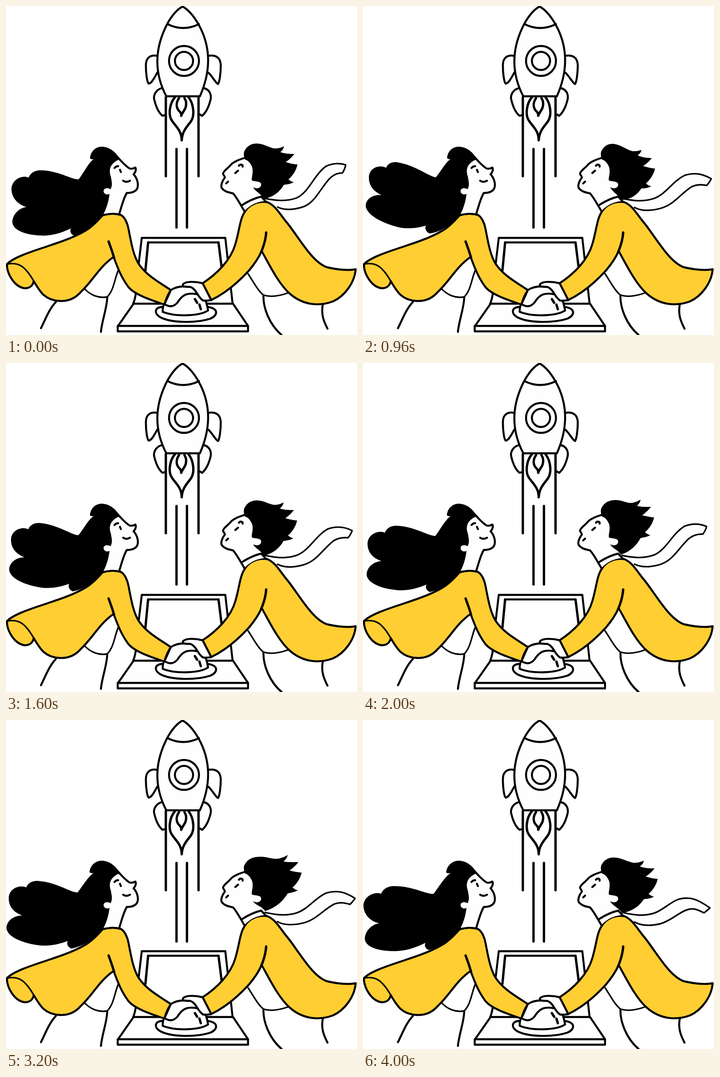
Write an HTML page that moves like this. It is 773 by 725 pixels and loops after 4080 ms.

```html
<!DOCTYPE html>
<html lang="en">
<head>
<meta charset="utf-8">
<title>Rocket launch</title>
<style>
  html, body { margin: 0; width: 100%; height: 100%; overflow: hidden; background: #fff; }
  svg { display: block; width: 100vw; height: 100vh; }
  .line { fill: none; stroke: #000; stroke-width: 4.4; stroke-linecap: round; stroke-linejoin: round; }
  .bold { stroke-width: 5.2; }
  .thin { stroke-width: 3.4; }
  .white { fill: #fefefe; }
  .coat { fill: #ffce33; }
  .skin { fill: #fefefe; stroke: none; }
</style>
</head>
<body>
<svg viewBox="0 0 773 725">
  <g class="line" id="rocket">
    <path d="M333 110C320 107 308 112 308 131C308 150 311 168 314 171C320 171 326 160 333 147M445 110C460 107 472 112 473 130C473 150 470 168 467 172C462 170 455 156 446 147"/>
    <path d="M343 181C332 184 325 194 326 204C330 222 337 236 345 242L351 240M436 181C448 184 452 194 451 204C447 222 440 235 432 242L427 239"/>
    <path class="white" d="M389 1C372 10 358 32 350 50C328 98 326 147 353 199H427C450 147 452 98 429 50C420 32 408 12 389 1Z"/>
    <path d="M356 40Q390 57 425 40"/>
    <circle cx="392" cy="121" r="33"/>
    <circle cx="392" cy="121" r="20"/>
    <path class="bold" d="M352 201V375M424 201V375M375.500 315V488M398.500 315V488"/>
    <path class="bold" d="M372 201C360 215 357 240 365 252C373 265 387 274 387 296C388 274 401 264 408 253C416 240 413 215 402 201"/>
    <path class="bold" d="M381 203C375 212 374 222 380 230C384 234 386 236 386 242C387 236 394 230 396 222C398 212 396 208 393 203"/>
  </g>

  <g class="line" id="laptop">
    <path d="M280 656C288 640 289 600 292 570L299 511H483L499 656"/>
    <path class="bold" d="M307 583L313 521M468 521L475 577"/>
    <path d="M313 521H468"/>
    <path class="white" d="M281 656H500L533 705V717H246V706Z"/>
    <path d="M246 705H533"/>
  </g>

  <g class="line" id="legs">
    <path d="M110 652C95 668 88 688 77 710M223 642C222 668 212 690 209 718"/>
    <path d="M567 638C566 665 580 702 607 725M698 656C693 680 700 695 708 711"/>
    <path class="thin" d="M172 622C185 637 205 645 223 641C238 625 238 605 247 583"/>
    <path class="thin" d="M533 590C545 608 555 628 567 637C585 643 605 638 622 632"/>
  </g>

  <path class="line thin white" id="scarf"/>

  <g class="line" id="coats">
    <path class="coat" d="M2 569C15 555 50 543 90 530C125 518 150 510 175 495C190 487 205 470 213 461C230 457 240 457 252 460C262 465 268 480 270 492C277 530 282 552 292 568C310 595 340 610 363 626C357 635 352 646 349 658C320 648 285 637 270 620C255 600 247 580 237 553C205 575 192 605 165 630C152 645 135 651 118 650C85 648 75 630 61 606C60 614 54 622 42 622C20 620 2 592 2 569Z"/>
    <path class="thin" d="M2 569C20 565 34 570 44 582C52 590 56 598 61 606"/>
    <path class="bold" d="M226 519C231 533 235 543 238 555"/>
    <path class="coat" d="M525 455C535 437 555 430 575 432C595 440 605 462 620 479C645 510 675 566 708 576C735 582 755 583 770 580C768 610 745 640 720 651C690 662 655 660 625 634C600 612 580 570 563 540C556 556 546 570 535 583C515 605 485 632 452 648L433 611C465 590 495 560 505 525C514 495 515 470 525 455Z"/>
    <path class="bold" d="M573 499C572 513 568 528 562 542"/>
  </g>

  <g class="line" id="hands">
    <path class="white" d="M345 663C327 664 325 677 340 686C365 699 420 699 450 689C468 681 468 666 443 663"/>
    <path class="white" d="M363 626C372 620 382 618 392 618H412C432 628 441 645 445 671C425 684 372 685 345 674C345 664 346 660 349 657Z"/>
    <path d="M349 657C360 664 370 663 378 653C388 637 398 631 420 635"/>
    <path class="bold" d="M416 646L421 654M426 658L429 668"/>
    <path class="white" d="M433 611C418 607 396 606 390 613C387 619 396 619 406 619C420 624 422 642 434 649Q443 650 452 648Z"/>
  </g>

  <path id="womanHair"/>
  <g class="line" id="womanFace">
    <path class="skin" d="M250 338L272 358L285 356L281 371C288 378 293 392 289 402C285 410 274 412 266 412C258 425 254 445 249 459L214 460C222 445 226 430 228 414C221 418 214 412 215 407C216 401 225 400 230 404C236 394 232 385 231 376C225 360 230 346 250 338Z"/>
    <path d="M244 331C256 345 264 353 272 358Q278 360 285 356Q288 363 281 371C288 378 293 392 289 402C285 410 274 412 266 412C258 425 254 445 249 459"/>
    <path d="M213 461C230 457 240 457 252 460"/>
    <path d="M239 357Q242 353 247 353M251 361L253 366M258 385Q265 390 273 385"/>
  </g>

  <g class="line" id="manFace">
    <path class="skin" d="M526 334C514 338 503 342 496 349L478 369L482 378C475 387 473 396 475 401C482 410 492 411 500 413C507 420 513 432 525 452C538 437 555 431 570 430L560 340Z"/>
    <path d="M528 334C514 338 503 342 496 349C489 358 480 362 478 369C478 373 482 374 482 378C475 387 473 396 475 401C482 410 492 411 500 413C507 420 513 432 525 452"/>
    <path d="M518 440C530 432 545 424 562 420L573 432"/>
    <path d="M513 352C516 348 522 349 521 354M505 368L511 363M485 391L489 387"/>
  </g>
  <path id="manHair"/>
  <path class="skin" d="M540 384C550 388 562 385 562 394C561 402 552 404 544 399Z"/>
</svg>
<script>
const LOOP = 4080, STEP = 80;

const WOMAN_HAIR = "M250 338C243 320 225 310 210 310C195 311 186 322 185 336C188 338 190 338 193 337C180 348 172 366 160 382C145 383 115 362 74 362C60 363 53 370 50 378C36 372 12 382 12 404C13 425 28 438 45 443C28 445 14 460 14 477C16 495 45 506 85 506C110 505 128 497 143 490C140 495 142 503 150 506C175 500 200 478 216 460L240 410Z";
const MAN_HAIR = "M526 338C523 330 523 322 526 318C532 307 542 303 552 303C568 303 580 313 592 314C602 314 608 311 612 309C612 314 608 319 604 322C615 326 627 326 635 326C630 333 622 340 616 344C626 347 636 349 642 349C640 360 632 374 622 382C627 386 631 388 634 388C626 393 618 393 612 394C604 408 590 421 568 425C562 414 552 411 545 401L543 386C538 382 546 370 542 355C538 345 532 340 526 338Z";
const SCARF_UP = "M570 424C590 428 615 432 640 423C668 410 678 372 705 353C720 346 736 346 748 350C747 358 744 363 741 368C728 368 720 373 712 381C690 405 680 436 650 444C632 449 612 450 598 443";
const SCARF_DOWN = "M570 424C590 428 612 434 640 426C660 420 675 402 695 395C722 388 738 396 764 414C759 419 755 422 751 425C742 421 732 414 718 417C698 421 680 442 655 449C635 454 612 454 598 445";

// Each track holds one value per key time.
const TIMES = [0, 960, 1600, 2000, 2640, 3200, 4000];
const TRACKS = {
  scarf: [0, .48, .3, .16, .42, .67, 1],
  upperX: [0, 1, -1, -2, -4, -6, -11],
  upperY: [0, -26, -14, -5, -13, -11, 6],
  lowerX: [0, -8, -7, -6, -9, -13, -10],
  lowerY: [0, -36, -21, -10, -20, -18, 6],
  manX: [0, 1, -1, -1, 5, 9, 7],
  manY: [0, 9, -2, -9, -15, -13, 1],
};

const clamp = v => Math.max(0, Math.min(1, v));
const mix = (a, b, k) => a + (b - a) * k;
const byId = id => document.getElementById(id);

// Smooth cubic through the keys.
function sample(values, t) {
  const last = TIMES.length - 1;
  let i = 0;
  while (i < last - 1 && t >= TIMES[i + 1]) i++;
  const span = TIMES[i + 1] - TIMES[i], u = (t - TIMES[i]) / span;
  const slope = j => {
    const a = Math.max(0, j - 1), b = Math.min(last, j + 1);
    return (values[b] - values[a]) / (TIMES[b] - TIMES[a]) * span;
  };
  const ease = u * u * (3 - 2 * u);
  return mix(values[i], values[i + 1], ease)
    + slope(i) * u * (1 - u) ** 2 - slope(i + 1) * u * u * (1 - u);
}

function warp(path, move) {
  let index = 0;
  return path.replace(/(\d+) (\d+)/g, (_, x, y) =>
    move(+x, +y, index++).map(v => v.toFixed(2)).join(" "));
}

const scarfEnd = [...SCARF_DOWN.matchAll(/(\d+) (\d+)/g)].map(m => [+m[1], +m[2]]);

function draw(t) {
  const pose = {};
  for (const name in TRACKS) pose[name] = sample(TRACKS[name], t);

  byId("womanHair").setAttribute("d", warp(WOMAN_HAIR, (x, y) => {
    const reach = clamp((190 - x) / 170), low = clamp((y - 420) / 40);
    return [
      x + mix(pose.upperX, pose.lowerX, low) * Math.sqrt(reach),
      y + mix(pose.upperY, pose.lowerY, low) * reach ** (1 + low * .4),
    ];
  }));

  byId("manHair").setAttribute("d", warp(MAN_HAIR, (x, y) => {
    const reach = clamp((x - 545) / 75);
    return [x + pose.manX * reach, y + pose.manY * reach];
  }));

  const s = pose.scarf;
  byId("scarf").setAttribute("d", warp(SCARF_UP, (x, y, i) => [
    mix(x, scarfEnd[i][0], s) + 45 * s * (1 - s) * clamp((x - 640) / 90),
    mix(y, scarfEnd[i][1], s),
  ]));

  byId("laptop").setAttribute("transform", `translate(0 ${t < 3040 ? 0 : -1.5})`);
}

function frame(now) {
  draw(Math.floor(now % LOOP / STEP) * STEP);
  requestAnimationFrame(frame);
}
draw(0);
requestAnimationFrame(frame);
</script>
</body>
</html>
```
